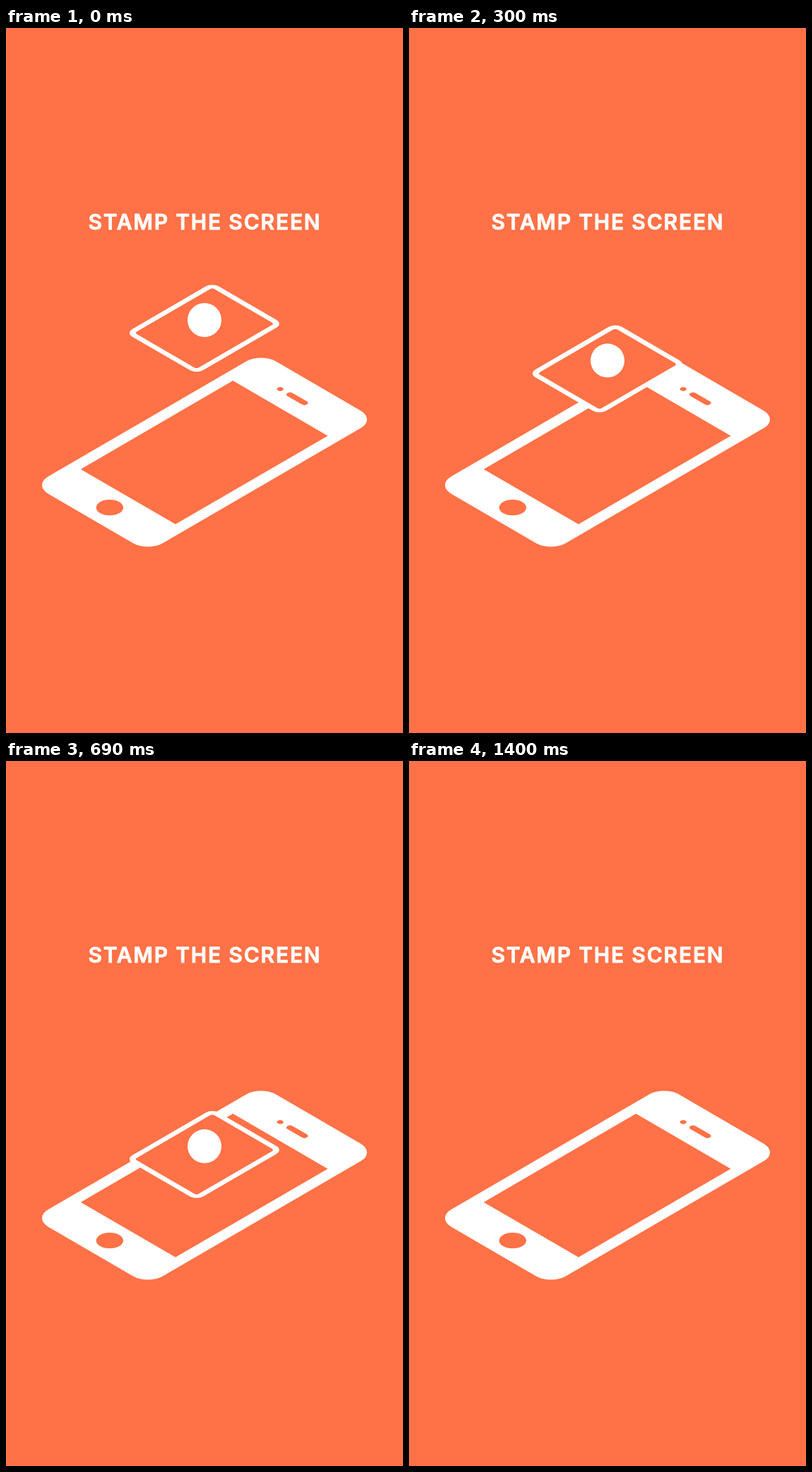
These frames come from a looping animation (562x997 px, 1900 ms). An HTML page with a canvas:

```html
<!DOCTYPE html>
<html lang="en">
<head>
<meta charset="utf-8">
<title>Stamp the screen</title>
<style>
  html, body { margin: 0; width: 100%; height: 100%; overflow: hidden; background: #ff7146; }
  canvas { display: block; }
</style>
</head>
<body>
<canvas id="stage" width="562" height="997"></canvas>
<script>
const ctx = document.getElementById('stage').getContext('2d');
const ORANGE = '#ff7146', WHITE = '#fff';
const LOOP = 1900, STEP = 30, LANDED = 900, GONE = 1400, DROP = 172;
const start = performance.now();

// Draws in an isometric plane whose origin sits at (x, y).
function iso(x, y, draw) {
  ctx.save();
  ctx.transform(0.866, 0.5025, -0.866, 0.5025, x, y);
  draw();
  ctx.restore();
}

function roundRect(x, y, w, h, r, color) {
  ctx.beginPath();
  ctx.roundRect(x, y, w, h, r);
  ctx.fillStyle = color;
  ctx.fill();
}

function disc(x, y, r, color) {
  ctx.beginPath();
  ctx.arc(x, y, r, 0, Math.PI * 2);
  ctx.fillStyle = color;
  ctx.fill();
}

function drawTitle() {
  ctx.font = '600 30px Inter, sans-serif';
  ctx.letterSpacing = '1.8px';
  ctx.textAlign = 'center';
  ctx.lineJoin = 'round';
  ctx.lineWidth = 0.8;
  ctx.fillStyle = ctx.strokeStyle = WHITE;
  ctx.fillText('STAMP THE SCREEN', 281.5, 285.2);
  ctx.strokeText('STAMP THE SCREEN', 281.5, 285.2);
}

function drawPhone() {
  iso(360.5, 459, () => {
    roundRect(0.7, 0, 187.4, 372.4, 24.4, WHITE);
    ctx.fillStyle = ORANGE;
    ctx.fillRect(17, 62.3, 155, 248.9);
  });
  iso(146.8, 678.2, () => disc(0, 0, 15.7, ORANGE));
  iso(388.2, 510.6, () => disc(0, 0, 3.9, ORANGE));
  iso(412.2, 524.3, () => roundRect(-16, -4.2, 32, 8.4, 4.2, ORANGE));
}

function drawCard(drop) {
  const line = 7.4, half = line / 2;
  iso(292, 360 + drop, () => {
    roundRect(half, half, 115.9 - line, 141.6 - line, 11 - half, ORANGE);
    ctx.strokeStyle = WHITE;
    ctx.lineWidth = line;
    ctx.stroke();
  });
  disc(281, 413 + drop, 24, WHITE);
}

function render() {
  const time = (performance.now() - start) % LOOP;
  ctx.fillStyle = ORANGE;
  ctx.fillRect(0, 0, 562, 997);
  drawTitle();
  drawPhone();
  if (time < GONE) {
    const stepped = Math.floor(time / STEP) * STEP;
    drawCard(DROP * Math.min(stepped / LANDED, 1));
  }
  requestAnimationFrame(render);
}
render();
</script>
</body>
</html>
```
